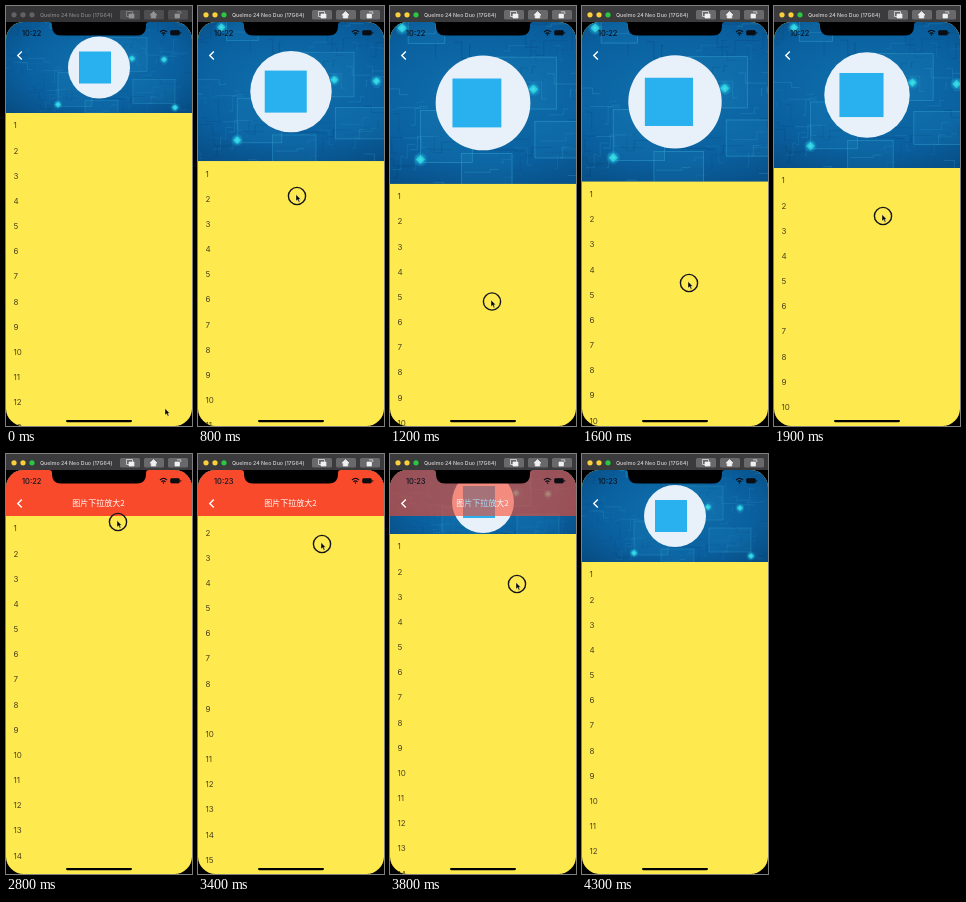
Write an HTML page that moves like this. It is 186 px wide and 420 px high and loops after 4400 ms.

```html
<!DOCTYPE html>
<html lang="zh">
<head>
<meta charset="utf-8">
<title>图片下拉放大2</title>
<style>
  html, body { margin: 0; width: 100%; height: 100%; overflow: hidden; background: #000; }
  svg { display: block; width: 100%; height: 100%; }
  text { font-family: Inter, Roboto, sans-serif; }
  .rows text { font-size: 8px; fill: #4a431f; }
  .title { font: 500 8px "Noto Sans CJK SC", "Noto Sans CJK", sans-serif; fill: #fff; }
  .device { font-size: 5.3px; font-weight: 500; }
  .clock { font-size: 7.5px; font-weight: 500; fill: #0a1420; }
</style>
</head>
<body>
<svg viewBox="0 0 186 420" preserveAspectRatio="none">
  <defs>
    <clipPath id="screen"><rect y="16" width="186" height="404" rx="17.5"/></clipPath>
    <clipPath id="header"><rect id="headerBox" y="16" width="186" height="91"/></clipPath>
    <radialGradient id="sea" cx=".5" cy=".45" r=".7">
      <stop offset="0" stop-color="#1070ad"/>
      <stop offset=".6" stop-color="#0a609f"/>
      <stop offset="1" stop-color="#074a80"/>
    </radialGradient>
    <radialGradient id="glow">
      <stop offset="0" stop-color="#6ff6f6"/>
      <stop offset=".3" stop-color="#22c8e0" stop-opacity=".8"/>
      <stop offset="1" stop-color="#1aa5d8" stop-opacity="0"/>
    </radialGradient>
  </defs>

  <rect width="186" height="420"/>
  <g clip-path="url(#screen)">
    <rect y="16" width="186" height="404" fill="#fee94f"/>
    <g id="rows" class="rows"></g>
    <g clip-path="url(#header)">
      <g id="picture">
        <rect x="-93" y="-53" width="186" height="106" fill="url(#sea)"/>
        <g id="circuit" fill="none" stroke-width=".5"></g>
        <g id="stars" fill="url(#glow)"></g>
        <circle r="31" fill="#e8f1f9"/>
        <rect x="-20" y="-16" width="32" height="32" fill="#29b0ee"/>
      </g>
    </g>
    <g id="bar">
      <rect y="16" width="186" height="46" fill="#fa4a2c"/>
      <text class="title" x="92.5" y="52" text-anchor="middle">图片下拉放大2</text>
    </g>
    <path d="M15.8 45.5L11.8 49.5L15.8 53.5" fill="none" stroke="#fff" stroke-width="1.4"/>
    <path d="M43 16Q46 16 46 19V20.5Q46 29.5 55 29.5H131Q140 29.5 140 20.5V19Q140 16 143 16Z"/>
    <text id="clock" class="clock" x="16" y="29.5"></text>
    <g fill="none" stroke="#0a0d12">
      <path d="M154 26Q157.5 22.8 161 26M155.5 27.8Q157.5 26 159.5 27.8" stroke-width="1.1"/>
      <circle cx="157.5" cy="29" r=".4"/>
      <rect x="164.5" y="24.5" width="9" height="4.6" rx="1.3" fill="#0a0d12" stroke-width=".6"/>
      <path d="M174.8 26V27.8" stroke-width=".8"/>
    </g>
    <rect x="60" y="414" width="66" height="2.2" rx="1.1"/>
  </g>

  <rect id="frame" width="186" height="16"/>
  <g id="lights"></g>
  <text id="device" class="device" x="34" y="10.8">Quelmo 24 Neo Duo (17G64)</text>
  <g id="buttons">
    <g id="keys"></g>
    <g fill="#f0f0f0" stroke="#f0f0f0" stroke-width=".7">
      <path d="M120.5 5.500H126.500V10.500H120.500Z" fill="none"/>
      <path d="M123 8H128V12H123Z"/>
      <path d="M144 9L147.500 5.500L151 9H149.800V12H145.200V9Z"/>
      <path d="M169 8H173.500V12H169Z"/>
      <path d="M171 5.800H174.800V8" fill="none"/>
    </g>
  </g>

  <g id="pointer">
    <circle id="ring" r="8.6" fill="none" stroke="#14141c" stroke-width="1.4"/>
    <path d="M-1 -1.5V5L.6 3.7L1.8 6.2L2.9 5.7L1.8 3.3H3.7Z" stroke="#fff6b8" stroke-width=".4"/>
  </g>
</svg>
<script>
const LOOP = 4400, STEP = 100, REST = 107, BAR = 62, ROW = 25.17;
const $ = id => document.getElementById(id);

function add(parent, tag, attrs, text) {
  const node = document.createElementNS('http://www.w3.org/2000/svg', tag);
  set(node, attrs);
  if (text) node.textContent = text;
  $(parent).append(node);
  return node;
}
function set(node, attrs) {
  for (const name in attrs) node.setAttribute(name, attrs[name]);
}

// time, x, y
const path = [
  [0, 160, 404], [100, 157, 390], [400, 102, 135], [500, 99, 115], [800, 99, 190],
  [1200, 102, 295.5], [1350, 104, 303], [1500, 106, 292], [1900, 109, 210],
  [2300, 109, 126], [2800, 112, 68], [2950, 113, 56], [3150, 118, 66],
  [3400, 124, 90], [3800, 127, 130], [4100, 128, 162], [4400, 128, 162]
];
// time, list top after the first drag
const settle = [
  [2800, 62], [2900, 54], [3100, 44], [3400, 41], [3800, 80],
  [4000, 102], [4100, 110], [4200, 111], [4300, 108], [4400, 107]
];

// Monotone cubic through one column of a table
function sample(table, t, col) {
  const last = table.length - 1;
  let i = 0;
  while (i < last - 1 && t >= table[i + 1][0]) i++;
  const slope = k => (table[k + 1][col] - table[k][col]) / (table[k + 1][0] - table[k][0]);
  const tangent = k => {
    if (k === 0) return slope(0);
    if (k === last) return slope(last - 1);
    const a = slope(k - 1), b = slope(k);
    return a * b <= 0 ? 0 : 2 * a * b / (a + b);
  };
  const [p, q] = [table[i], table[i + 1]], h = q[0] - p[0], u = (t - p[0]) / h;
  const v = 1 - u;
  return p[col] * v * v * (1 + 2 * u) + q[col] * u * u * (3 - 2 * u)
    + h * u * v * (tangent(i) * v - tangent(i + 1) * u);
}

// Rubber band below the resting edge, nearly direct above it
function dragged(y) {
  const d = y - 115;
  return REST + (d > 0 ? 79.2 * (1 - Math.exp(-d / 80)) : d * 0.955);
}
function listTop(t) {
  if (t < 500) return REST;
  return t < 2800 ? dragged(sample(path, t, 2)) : sample(settle, t, 1);
}

for (let n = 1; n <= 17; n++) add('rows', 'text', { x: 7.5, y: ROW * (n - 1) + 15.4 }, String(n));

let seed = 11;
const random = () => (seed = seed * 16807 % 2147483647) / 2147483647;
for (let i = 0; i < 110; i++) {
  const x = random() * 186 - 93, y = random() * 106 - 53;
  const dx = (random() - 0.5) * 34, dy = (random() - 0.5) * 24;
  add('circuit', 'path', {
    d: `M${x} ${y}h${dx}v${dy}h${dx / 3}`,
    stroke: i % 2 ? '#3fa9d8' : '#043a6c',
    opacity: 0.12 + random() * 0.3
  });
}
const panels = [[8, -30, 40, 34], [34, 12, 42, 24], [-41, 5, 34, 34], [-49, -56, 24, 17], [-14, 33, 33, 26]];
for (const [x, y, width, height] of panels)
  add('circuit', 'rect', { x, y, width, height, opacity: 0.5, stroke: '#3fb4dc', fill: '#2a9ccc', 'fill-opacity': 0.25 });
for (const [x, y] of [[33, -9], [65, -8], [-41, 37], [76, 40], [-53, -49]]) {
  add('stars', 'circle', { cx: x, cy: y, r: 5 });
  add('stars', 'path', { d: `M${x - 3} ${y}L${x} ${y - 3}L${x + 3} ${y}L${x} ${y + 3}Z`, fill: '#35dce6', opacity: 0.7 });
}
const lights = ['#f9cf3c', '#fbd03a', '#28c840'].map((color, i) =>
  [add('lights', 'circle', { cx: 8 + 9 * i, cy: 8.8, r: 2.6 }), color]);
for (const [x, w] of [[114, 20], [138, 20], [162, 20]])
  add('keys', 'rect', { x, y: 4, width: w, height: 9.5, rx: 1.5, fill: '#69696b' });

function draw(t) {
  const top = listTop(t), height = Math.max(0, top - 16);
  const scale = Math.max(1, height / 106);
  set($('rows'), { transform: `translate(0 ${top})` });
  set($('headerBox'), { height });
  set($('picture'), { transform: `translate(93 ${16 + height / 2}) scale(${scale})` });
  set($('bar'), { opacity: Math.min(1, Math.max(0, (REST - top) / (REST - BAR))) });
  $('clock').textContent = t < 3000 ? '10:22' : '10:23';

  const active = t >= 500;
  set($('frame'), { fill: active ? '#3b3b3d' : '#343436' });
  set($('device'), { fill: active ? '#d2d2d4' : '#87878a' });
  set($('buttons'), { opacity: active ? 1 : 0.5 });
  for (const [node, color] of lights) set(node, { fill: active ? color : '#626264' });

  const pressed = t >= 500 && t < 3000 || t >= 3400 && t < 4100;
  set($('pointer'), {
    transform: `translate(${sample(path, t, 1)} ${sample(path, t, 2)})`,
    visibility: t < 4200 ? 'visible' : 'hidden'
  });
  set($('ring'), { opacity: pressed ? 1 : 0 });
}

let start;
function tick(now) {
  start ??= now;
  draw(Math.floor((now - start) % LOOP / STEP) * STEP);
  requestAnimationFrame(tick);
}
draw(0);
requestAnimationFrame(tick);
</script>
</body>
</html>
```
